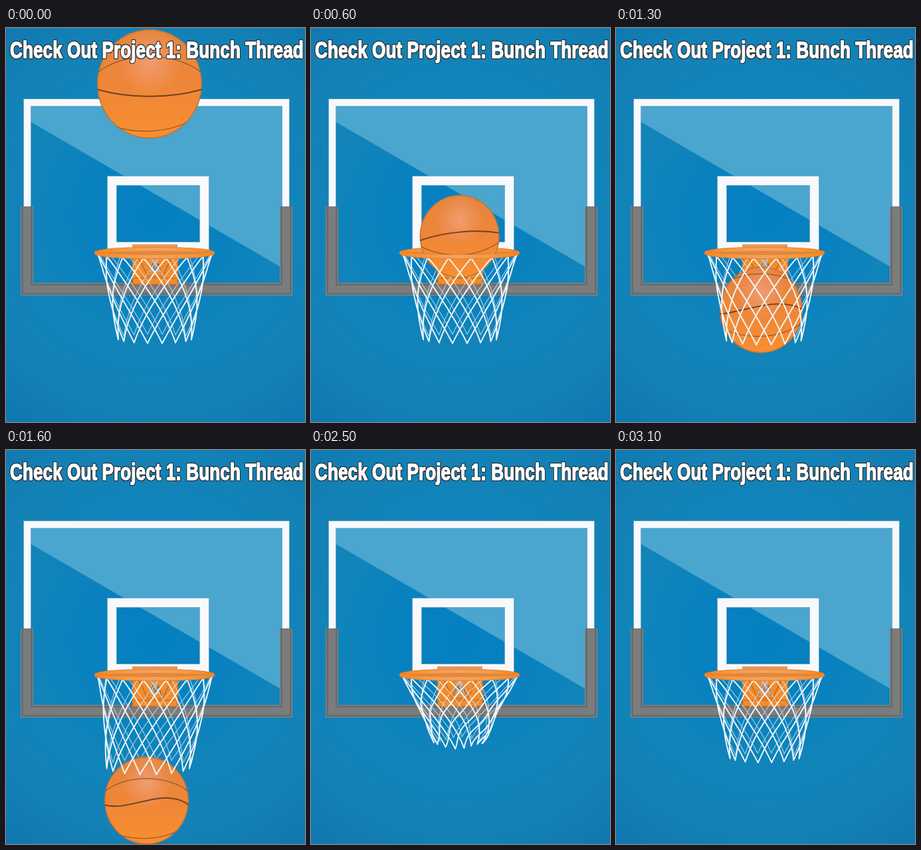
Animation, 450 px wide and 592 px high, one loop 3200 ms. Source, as an HTML page with a canvas:

```html
<!DOCTYPE html>
<html lang="en">
<head>
<meta charset="utf-8">
<title>Basketball</title>
<style>
  html, body { margin: 0; width: 100%; height: 100%; overflow: hidden; background: #1080b8; }
  canvas, svg { position: absolute; left: 0; top: 0; display: block; }
  text { font: bold 35px "Liberation Sans", Arial, sans-serif; stroke-linejoin: round; }
  .outline { fill: #22282c; stroke: #22282c; stroke-width: 4.2; }
  .face { fill: #fff; stroke: #fff; stroke-width: 1.6; }
</style>
</head>
<body>
<canvas id="stage" width="450" height="592"></canvas>
<svg width="450" height="592" viewBox="0 0 450 592">
  <g transform="translate(6 45) scale(.75 1)">
    <text class="outline" aria-hidden="true">Check Out Project 1: Bunch Thread</text>
    <text class="face">Check Out Project 1: Bunch Thread</text>
  </g>
</svg>
<script>
const ctx = document.getElementById('stage').getContext('2d');
const LOOP = 3.2, FPS = 10, BALL_GONE = 1.85;
const RIM = { x: 223.5, y: 338, rx: 87, ry: 5.5 };
const { PI, sin, cos, max, min } = Math;
const lerp = (a, b, k) => a + (b - a) * k;

function ballAt(s) {
  const roll = sin(PI * s / 1.6);
  return {
    // Fast drop, slowed by the rim and net, then falling free
    x: 216 + 22 * s - 15.5 * s * s,
    y: 84 + 660 * s - 598 * s ** 2 + 224 * s ** 3,
    r: 60 + 19 * max(0, 1 - s / .6) ** 2 + 3.5 * max(0, s - .6),
    roll,
    twist: lerp(.27, -.33, min(1, s / .8))
  };
}

function netAt(s) {
  const push = Math.exp(-(((s - 1.55) / .18) ** 2));
  const recoil = sin(PI * max(0, (s - 1.7) / 1.5) ** .7);
  return {
    x: 224 - 11 * push - 2 * recoil,
    y: 467 + 10 * push - 30 * recoil,
    r: 56 + 8 * push - 22 * recoil,
    depth: 7 + 5 * push,
    taper: .72 + .22 * recoil,
    ripple: 2.3 * recoil
  };
}

function gradient(g, ...colors) {
  colors.forEach((c, i) => g.addColorStop(i / (colors.length - 1), c));
  return g;
}

function stroke(color, width) {
  ctx.strokeStyle = color;
  ctx.lineWidth = width;
  ctx.stroke();
}

function path(...pts) {
  ctx.beginPath();
  pts.forEach(p => ctx.lineTo(...p));
}

function polygon(fill, ...pts) {
  path(...pts);
  ctx.fillStyle = fill;
  ctx.fill();
}

function box(fill, x, y, w, h) {
  ctx.fillStyle = fill;
  ctx.fillRect(x, y, w, h);
}

function frame(x, y, w, h, width) {
  ctx.beginPath();
  ctx.rect(x + width / 2, y + width / 2, w - width, h - width);
  stroke('#8fb3c6', width + 1.5);
  stroke('#f7f9fc', width);
}

function drawBoard() {
  ctx.lineCap = 'butt';
  ctx.lineJoin = 'miter';
  box(gradient(ctx.createRadialGradient(225, 285, 0, 225, 285, 390),
    '#0480c1', '#0881bf', '#1184ba', '#1381b5', '#0f75af'), 0, 0, 450, 592);
  polygon('#4aa5cf', [37, 117], [415, 117], [415, 360], [37, 141]);
  frame(27, 107, 399, 290, 10);

  path([31.5, 268], [31.5, 392.5], [421.5, 392.5], [421.5, 268]);
  stroke('#8d9599', 19);
  stroke('#6a6c6d', 17.5);
  stroke('#7b7c7d', 11);

  frame(153, 223, 152, 112, 13);
}

function drawMount() {
  box('#d97624', 190, 345, 69, 41);
  box('#f38b2b', 192, 347, 65, 37);
  path([193, 376], [256, 376]);
  stroke('#b8611e', 1.2);
  path([201, 347], [213, 373], [236, 373], [248, 347]);
  stroke('#b8611e', 1.2);
  polygon('#c9a384', [219, 348], [228, 348], [233, 367], [215, 367]);
  path([214, 369], [221, 354], [225, 365], [229, 354], [234, 369]);
  stroke('#816950', 1.4);
}

function rimArc(from, to) {
  ctx.beginPath();
  ctx.ellipse(RIM.x, RIM.y, RIM.rx, RIM.ry, 0, from, to);
  stroke('#dd7a28', 7);
  stroke(gradient(ctx.createLinearGradient(133, 0, 314, 0),
    '#f28521', '#f59a48', '#f6a35a', '#f59a48', '#f28521'), 5.5);
}

function drawRimBack() {
  box('#e39c63', 190, 325, 68, 9);
  ctx.beginPath();
  ctx.ellipse(RIM.x, RIM.y, RIM.rx, RIM.ry, 0, 0, 2 * PI);
  ctx.fillStyle = '#e08a40';
  ctx.fill();
  rimArc(PI, 2 * PI);
}

// Crossed helices on a tapering tube; the sine of the angle separates front from back.
function drawNet(net, front) {
  const cords = 16, rows = 6, parts = 30;
  ctx.lineCap = ctx.lineJoin = 'round';
  ctx.beginPath();
  for (let i = 0; i < cords; i++) for (const way of [-1, 1]) {
    let drawing = false;
    for (let n = 0; n <= parts; n++) {
      const v = n / parts;
      const a = ((2 * i + 1) + way * v * rows) * PI / cords;
      const near = sin(a);
      if ((near >= -.02) !== front) { drawing = false; continue; }
      const wave = net.ripple * v * sin(v * 9 + a * 3);
      const x = lerp(224, net.x, v ** 1.5) + lerp(88, net.r, v ** net.taper) * cos(a) + wave;
      const y = lerp(339, net.y, v) + lerp(7, net.depth, v) * near + wave;
      drawing ? ctx.lineTo(x, y) : ctx.moveTo(x, y);
      drawing = true;
    }
  }
  stroke(front ? '#f0f7fb' : 'rgba(215,234,244,.7)', front ? 1.9 : 1.2);
}

function drawBall({ x, y, r, roll, twist }) {
  const low = .95 - .45 * roll, up = -.3 - .6 * roll;
  ctx.save();
  ctx.translate(x, y);
  ctx.scale(r, r * 1.04);
  ctx.beginPath();
  ctx.arc(0, 0, 1, 0, 2 * PI);
  ctx.clip();
  ctx.fillStyle = gradient(ctx.createLinearGradient(0, -1, 0, 1), '#e5853f', '#ee8638', '#f98f30');
  ctx.fill();
  ctx.fillStyle = gradient(ctx.createRadialGradient(0, -.4, 0, 0, -.4, .6),
    'rgba(244,165,135,.7)', 'rgba(244,165,135,0)');
  ctx.fill();
  stroke('#bf7138', 3 / r);

  ctx.beginPath();
  ctx.moveTo(-1, .1);
  ctx.bezierCurveTo(-.4, .27 - .4 * roll, .4, twist, 1, .1 - .2 * roll);
  stroke('#6c4226', 1.8 / r);
  ctx.beginPath();
  ctx.moveTo(-1, up + .1);
  ctx.bezierCurveTo(-.5, up - .3, .5, up - .3, 1, up + .1);
  ctx.moveTo(-1, low - .3);
  ctx.bezierCurveTo(-.4, low, .4, low, 1, low - .4);
  stroke('#94592f', 1.3 / r);
  ctx.restore();
}

function draw(s) {
  const net = netAt(s);
  drawBoard();
  drawMount();
  drawNet(net, false);
  drawRimBack();
  if (s < BALL_GONE) drawBall(ballAt(s));
  drawNet(net, true);
  rimArc(0, PI);
}

function tick() {
  const s = performance.now() / 1000 % LOOP;
  draw(Math.floor(s * FPS) / FPS);
  requestAnimationFrame(tick);
}
tick();
</script>
</body>
</html>
```
